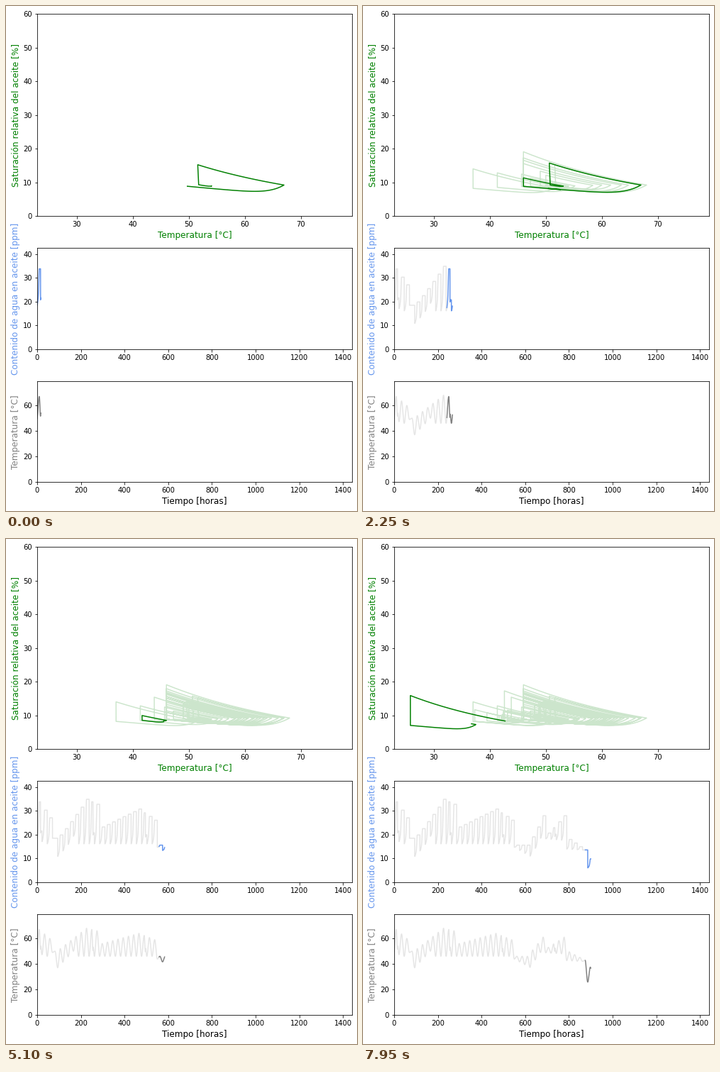
A matplotlib script for the animation above (8 s loop, 495x712 px).

```python
import numpy as np
import matplotlib.pyplot as plt
from matplotlib.animation import FuncAnimation

W, H, DPI = 495, 712, 72
PER_HOUR = 6            # samples per hour
STEP, TAIL = 100, 150   # samples added per update, samples highlighted
TICKS_PER_UPDATE = 3    # 50 ms ticks, one update every 150 ms
DAYS = 38


def daily_low(day):
    return np.interp(day, [0, 2, 3, 4, 7, 8, 22, 26, 28, 32, 33, 36, 37],
                     [48.5, 46, 49, 37, 50, 46, 46, 37.3, 49, 48, 42.6, 42, 25.8])


def daily_high(day):
    return np.interp(day, [0, 2, 3, 4, 9, 11, 12, 19, 22, 23, 25, 28, 29, 32, 33, 36, 37],
                     [67, 60, 50, 52, 68, 66, 56, 64, 59, 46, 46, 61, 53, 61, 49.5, 43, 37.5])


def turning_points():
    """Lowest at 22 h, highest at 10 h, a short rebound every tenth day."""
    for day in range(DAYS):
        start, low, high = 24 * day, daily_low(day), daily_high(day)
        yield start - 2, low
        yield start + 10, high
        if day % 10 == 0:
            dip = high - 0.78 * (high - daily_low(day + 1))
            yield start + 15.5, dip
            yield start + 16.5, dip + 2.5


def solubility(temp):
    """Water solubility of the oil in ppm."""
    return 10 ** (7.172 - 1567 / (temp + 273.15))


def valley_ppm(temp):
    rs = np.interp(temp, [26, 37, 46, 60], [7, 8.2, 8.8, 10.1])
    return solubility(temp) * rs / 100


def peak_ppm(temp):
    rs = np.interp(temp, [37, 46, 60], [7.2, 8.5, 9.2])
    return solubility(temp) * rs / 100


def simulate():
    """Water is held while cooling, released at a low, absorbed on heating."""
    hours = np.arange(900 * PER_HOUR + 1) / PER_HOUR
    temp, ppm = np.zeros((2, hours.size))
    turns = list(turning_points())
    level = valley_ppm(turns[0][1])
    # The closing turn completes the last day.
    turns.append((24 * DAYS - 2, daily_low(DAYS)))
    for (h0, t0), (h1, t1) in zip(turns, turns[1:]):
        part = (hours > h0) & (hours <= h1)
        u = (1 - np.cos(np.pi * (hours[part] - h0) / (h1 - h0))) / 2
        temp[part] = t0 + (t1 - t0) * u
        if t1 < t0:
            ppm[part] = level
            level = min(level, valley_ppm(t1))
        else:
            top = max(level, peak_ppm(t1))
            ppm[part] = level + (top - level) * (0.36 * u + 0.64 * u ** 8)
            level = top
    return hours, temp, ppm


hours, temp, ppm = simulate()
saturation = 100 * ppm / solubility(temp)

plt.rcParams["font.family"] = "DejaVu Sans"
fig = plt.figure(figsize=(W / DPI, H / DPI), dpi=DPI, facecolor="white")


def add_axes(top, height, xlim, ylim):
    box = [43.9 / W, 1 - (top + height) / H, 444 / W, height / H]
    return fig.add_axes(box, xlim=xlim, ylim=ylim)


def add_side_label(y, text, color):
    fig.text(13.5 / W, 1 - y / H, text, color=color, size=12,
             rotation=90, ha="center", va="center")


ax_sat = add_axes(11.1, 285, (22.9, 79.15), (0, 60))
ax_ppm = add_axes(341.1, 142.5, (0, 1441), (0, 42.6))
ax_temp = add_axes(528.6, 142.5, (0, 1441), (0, 79.2))
ax_sat.set_xticks(range(30, 71, 10))
ax_ppm.set_yticks(range(0, 41, 10))
ax_temp.set_yticks(range(0, 61, 20))
for ax in (ax_ppm, ax_temp):
    ax.set_xticks(range(0, 1401, 200))

ax_sat.set_xlabel("Temperatura [°C]", color="green", size=12)
ax_temp.set_xlabel("Tiempo [horas]", size=12)
add_side_label(154, "Saturación relativa del aceite [%]", "green")
add_side_label(413, "Contenido de agua en aceite [ppm]", "cornflowerblue")
add_side_label(600.5, "Temperatura [°C]", "gray")

curves = []
for ax, x, y, past, now in (
        (ax_sat, temp, saturation, "green", "green"),
        (ax_ppm, hours, ppm, "gray", "cornflowerblue"),
        (ax_temp, hours, temp, "gray", "gray")):
    trail, = ax.plot([], [], color=past, alpha=0.2)
    recent, = ax.plot([], [], color=now)
    curves.append((x, y, trail, recent))


def update(tick):
    head = (tick // TICKS_PER_UPDATE + 1) * STEP
    tail = max(0, head - TAIL)
    artists = []
    for x, y, trail, recent in curves:
        trail.set_data(x[:tail + 1], y[:tail + 1])
        recent.set_data(x[tail:head + 1], y[tail:head + 1])
        artists += [trail, recent]
    return artists


anim = FuncAnimation(fig, update, frames=160, interval=50, repeat=True,
                     repeat_delay=0)
plt.show()
```
